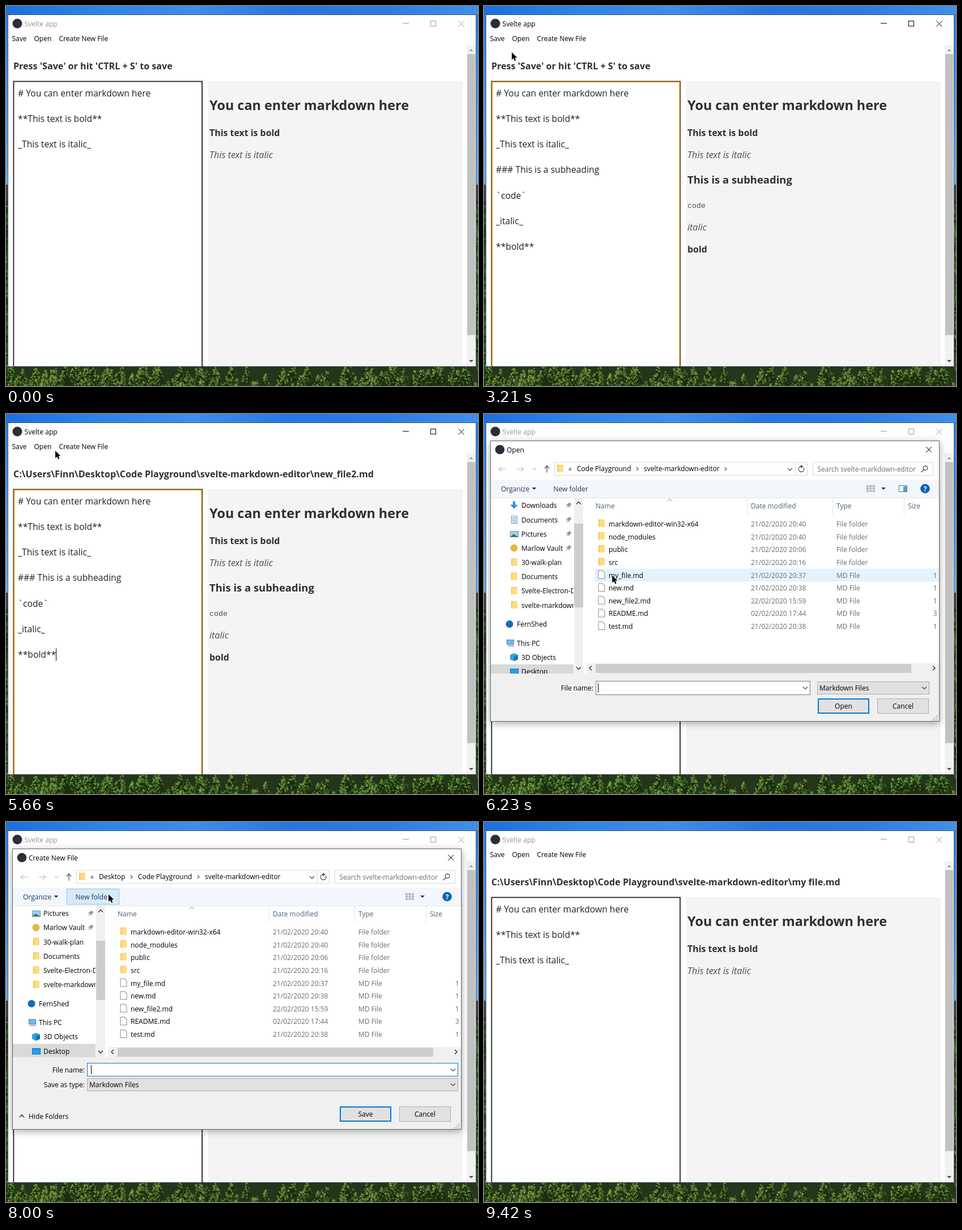
An HTML page with a canvas that plays this animation: 833 by 672 pixels, repeating every 9440 ms.

```html
<!DOCTYPE html>
<html lang="en">
<head>
<meta charset="utf-8">
<title>Markdown editor</title>
<style>
html, body { margin: 0; width: 100%; height: 100%; overflow: hidden; background: #fff; }
canvas { display: block; width: 833px; height: 672px; }
</style>
</head>
<body>
<canvas id="stage" width="833" height="672"></canvas>
<script>
const W = 833, H = 672, LOOP = 9440;
const stage = document.getElementById('stage');
let g = stage.getContext('2d');
const SANS = '"Open Sans", "Noto Sans", sans-serif';
const MONO = '"Liberation Mono", monospace';

// ---------- drawing helpers ----------
function box(x, y, w, h, color) {
  g.fillStyle = color;
  g.fillRect(x, y, w, h);
}
function frame(x, y, w, h, fill, edge, line = 1) {
  box(x, y, w, h, edge);
  box(x + line, y + line, w - 2 * line, h - 2 * line, fill);
}
function text(s, x, y, color = '#000', size = 12, style = '', align = 'left', family = SANS) {
  g.font = `${style} ${size}px ${family}`;
  g.textAlign = align;
  g.fillStyle = color;
  g.fillText(s, x, y);
}
function poly(points, color, fill, line = 1) {
  g.beginPath();
  points.forEach(([x, y], i) => i ? g.lineTo(x, y) : g.moveTo(x, y));
  if (fill) {
    g.closePath();
    g.fillStyle = color;
    g.fill();
  } else {
    g.lineWidth = line;
    g.strokeStyle = color;
    g.stroke();
  }
}
function disc(x, y, r, color) {
  g.beginPath();
  g.arc(x, y, r, 0, 7);
  g.fillStyle = color;
  g.fill();
}
function chevron(x, y, dir, color = '#444', s = 4, line = 1.2) {
  const h = s / 2;
  const shape = {
    down: [[x - s, y - h], [x, y + h], [x + s, y - h]],
    up: [[x - s, y + h], [x, y - h], [x + s, y + h]],
    right: [[x - h, y - s], [x + h, y], [x - h, y + s]],
    left: [[x + h, y - s], [x - h, y], [x + h, y + s]]
  };
  poly(shape[dir], color, false, line);
}
function triangle(x, y, s, color) {
  poly([[x - 4, y - s], [x + 4, y - s], [x, y + s]], color, true);
}
function cross(x, y, r, color) {
  poly([[x - r, y - r], [x + r, y + r]], color);
  poly([[x + r, y - r], [x - r, y + r]], color);
}
function arrow(x, y, dx, dy, color) {
  const tip = [x + dx * 6, y + dy * 6];
  poly([[x - dx * 6, y - dy * 6], tip], color, false, 1.3);
  poly([[tip[0] - dx * 5 - dy * 4, tip[1] - dy * 5 - dx * 4], tip,
    [tip[0] - dx * 5 + dy * 4, tip[1] - dy * 5 + dx * 4]], color, false, 1.3);
}
function clipped(x, y, w, h, draw) {
  g.save();
  g.beginPath();
  g.rect(x, y, w, h);
  g.clip();
  draw();
  g.restore();
}

// ---------- desktop, painted once ----------
function paintDesktop() {
  const c = document.createElement('canvas');
  c.width = W;
  c.height = H;
  const main = g;
  g = c.getContext('2d');
  let seed = 11;
  const rnd = () => (seed = (seed * 16807) % 2147483647) / 2147483647;

  const top = g.createLinearGradient(0, 0, W, 0);
  ['#1d6fdc', '#2f83e6', '#3c8eea', '#2678e0', '#2a7ce2', '#3f90ea'].forEach((k, i) => top.addColorStop(i / 5, k));
  box(0, 0, W, H, top);
  const sky = g.createLinearGradient(0, 15, 0, 325);
  sky.addColorStop(0, '#2a7ee2');
  sky.addColorStop(1, '#6fb2ee');
  box(0, 15, W, 310, sky);
  box(0, 316, W, 46, '#3c4146');
  box(0, 345, W, H, '#24361a');
  const greens = ['#16230d', '#24391a', '#35521f', '#4a6e2a', '#618a36', '#7ba244'];
  for (let i = 0; i < 700; i++) {
    const x = rnd() < .5 ? rnd() * 4 : 829 + rnd() * 4;
    box(x, 350 + rnd() * 290, 2, 2 + rnd() * 5, greens[Math.floor(rnd() * 5)]);
  }
  for (let i = 0; i < 150; i++) {
    const x = rnd() * W, y = 626 + i * .24 + rnd() * 8, wide = 7 + rnd() * 7;
    poly([[x, y], [x + wide, y + 36], [x - wide, y + 36]], '#1b2c10', true);
    for (let k = 0; k < 42; k++) {
      const d = rnd(), side = rnd() * 2 - 1;
      const tone = Math.max(0, Math.min(5, Math.floor(3.6 - side * 1.5 - d * 1.6 + rnd() * 2)));
      box(x + side * wide * (d + .12), y + d * 34, 1 + rnd() * 2.2, 1 + rnd() * 2.4, greens[tone]);
    }
  }
  g = main;
  return c;
}
const desktop = paintDesktop();

// ---------- script of events ----------
const BASE = ['# You can enter markdown here', '**This text is bold**', '_This text is italic_'];
const ADDED = [
  { s: '### This is a subheading', from: 940, to: 1420 },
  { s: '`code`', from: 1490, to: 1620 },
  { s: '_italic_', from: 1700, to: 1920 },
  { s: '**bold**', from: 2040, to: 2560 }
];
const ROOT = 'C:\\Users\\Finn\\Desktop\\Code Playground\\svelte-markdown-editor\\';
const DIALOGS = [
  { kind: 'save', from: 3680, to: 4790, name: 'new_file2', keys: [3980, 4610] },
  { kind: 'open', from: 5900, to: 7060 },
  { kind: 'save', from: 7780, to: 9310, name: 'my file', keys: [8300, 8950], deep: true }
];
// each run: time, x, y
const MOUSE = [
  [[90, 420, 330], [470, 176, 246], [690, 176, 246]],
  [[2900, 150, 214], [3210, 49, 82], [3260, 49, 80], [3520, 138, 60], [3980, 150, 62]],
  [[4890, 634, 514], [5220, 122, 427], [5280, 122, 427], [5660, 87, 65], [5780, 66, 58],
    [5900, 66, 58], [6300, 240, 305], [6420, 240, 305], [6880, 631, 513], [7080, 631, 513],
    [7600, 142, 59], [7780, 142, 59], [7980, 181, 128], [8290, 181, 128]]
];

const inside = (t, a, b) => t >= a && t < b;
function typed(s, t, from, to) {
  return s.slice(0, Math.floor(s.length * Math.max(0, Math.min(1, (t - from) / (to - from))) + 1e-6));
}
function mouseAt(t) {
  for (const run of MOUSE) {
    for (let i = 1; i < run.length; i++) {
      const a = run[i - 1], b = run[i];
      if (!inside(t, a[0], b[0])) continue;
      const p = (t - a[0]) / (b[0] - a[0]), e = p * p * (3 - 2 * p);
      return { x: a[1] + (b[1] - a[1]) * e, y: a[2] + (b[2] - a[2]) * e };
    }
  }
  return null;
}
function linesAt(t) {
  const lines = BASE.slice();
  if (t < 7060) for (const a of ADDED) if (t >= a.from) lines.push(typed(a.s, t, a.from, a.to));
  return lines;
}
function pathAt(t) {
  if (t < 4860) return "Press 'Save' or hit 'CTRL + S' to save";
  return ROOT + (t < 7060 ? 'new_file2.md' : t < 9310 ? 'new.md' : 'my file.md');
}

// ---------- editor window ----------
const PREVIEW_Y = [183.5, 229.5, 269, 313.5, 357, 396.5, 436];
function preview(line, y) {
  const rules = [
    [/^# (.+)$/, '#2f2f2f', 23.4, 'bold'],
    [/^### (.+)$/, '#2f2f2f', 18.45, 'bold'],
    [/^\*\*(.+)\*\*$/, '#2f2f2f', 15.9, 'bold'],
    [/^_(.+)_$/, '#4c4c4c', 16.2, 'italic'],
    [/^`(.+)`$/, '#4c4c4c', 13.33, '', MONO]
  ];
  for (const [re, color, size, style, family] of rules) {
    const m = line.match(re);
    if (m) return text(m[1], 359, y, color, size, style, 'left', family);
  }
  text(line, 359, y, '#333', 15.7);
}
function drawApp(t, active, focus) {
  box(3, 15, 827, 623, '#4a5a68');
  box(4, 16, 825, 621, '#fff');
  disc(20, 31, 8.5, '#2b2e3a');
  text('Svelte app', 32.5, 35.5, active ? '#000' : '#8f9899', 12.1);
  const ink = active ? '#000' : '#999';
  box(700, 30, 11, 1, ink);
  g.lineWidth = 1;
  g.strokeStyle = ink;
  g.strokeRect(749.5, 26.5, 9, 9);
  cross(803.5, 31.5, 5, ink);
  text('Save', 10.5, 62);
  text('Open', 49.5, 62);
  text('Create New File', 93.5, 62);

  box(813, 69, 16, 568, '#f1f1f1');
  box(814, 85, 14, 497, '#c1c1c1');
  poly([[817, 80], [825, 80], [821, 76]], '#a3a3a3', true);
  triangle(821, 628, 2, '#505050');

  text(pathAt(t), 13, 111.5, '#2f2f2f', 16.1, 'bold');
  box(357, 133, 449, 504, '#f4f4f4');
  clipped(12, 132, 336, 505, () => {
    frame(12.5, 132.5, 334.5, 530, '#fff', '#222', 1.8);
    if (focus) frame(13.5, 133.5, 332.5, 530, '#fff', '#e59a10', 1.6);
  });
  const lines = linesAt(t);
  lines.forEach((line, i) => {
    text(line, 21, 159.5 + i * 45.25, '#222', 15.7);
    preview(line, PREVIEW_Y[i]);
  });
  if (focus) {
    let last = t >= 5230 ? 5230 : 500;
    for (const a of ADDED) if (t < 5230 && t >= a.from) last = Math.min(t, a.to);
    if ((t - last) % 1000 < 500) {
      const i = lines.length - 1;
      g.font = `15.7px ${SANS}`;
      box(Math.round(21 + g.measureText(lines[i]).width), 143 + i * 45.25, 1, 22, '#000');
    }
  }
}

// ---------- file dialog ----------
function folder(x, y) {
  box(x, y, 10, 13, '#f3c55a');
  box(x + 2, y + 1, 9, 12, '#ffdc82');
}
function sheet(x, y) {
  poly([[x, y], [x + 8, y], [x + 12, y + 4], [x + 12, y + 15], [x, y + 15]], '#8a8a8a', true);
  poly([[x + 1, y + 1], [x + 7.5, y + 1], [x + 11, y + 4.5], [x + 11, y + 14], [x + 1, y + 14]], '#fff', true);
}
function picture(x, y) {
  frame(x, y + 2, 15, 11, '#9fd2f4', '#6b8ba4');
  poly([[x + 1, y + 12], [x + 6, y + 7], [x + 14, y + 12]], '#3a7a5a', true);
}
const SIDE_ICONS = {
  down: (x, y) => {
    box(x + 5, y, 4, 7, '#2f8fe0');
    poly([[x, y + 6], [x + 14, y + 6], [x + 7, y + 13]], '#2f8fe0', true);
  },
  doc: (x, y) => {
    frame(x + 2, y, 11, 14, '#fff', '#7c8b99');
    for (let i = 0; i < 4; i++) box(x + 4, y + 3 + i * 2.5, 7, 1, '#4b8fd0');
  },
  pic: picture,
  vault: (x, y) => disc(x + 7, y + 7, 6.5, '#e5b93c'),
  folder: (x, y) => folder(x + 2, y),
  cloud: (x, y) => disc(x + 8, y + 7, 6.5, '#0f6cbf'),
  pc: (x, y) => {
    frame(x + 3, y + 1, 13, 9, '#6cbcf2', '#4a7fa8');
    box(x + 5, y + 11, 11, 2, '#9aa7b0');
  },
  cube: (x, y) => {
    poly([[x, y + 3], [x + 7, y], [x + 14, y + 3], [x + 14, y + 11], [x + 7, y + 14], [x, y + 11]], '#35a0dc', true);
    poly([[x + 7, y + 6], [x + 14, y + 3], [x + 14, y + 11], [x + 7, y + 14]], '#1673b8', true);
  },
  desk: (x, y) => frame(x, y + 2, 15, 11, '#1fa0f2', '#0d6fb8')
};
const SIDE = [
  ['down', 'Downloads', 161.5], ['doc', 'Documents', 187], ['pic', 'Pictures', 212],
  ['vault', 'Marlow Vault', 237], ['folder', '30-walk-plan', 262.3], ['folder', 'Documents', 287.5],
  ['folder', 'Svelte-Electron-Demo', 312.6], ['folder', 'svelte-markdown-editor', 338],
  ['cloud', 'FernShed', 371.5], ['pc', 'This PC', 405], ['cube', '3D Objects', 430], ['desk', 'Desktop', 455.3]
];
const DAY = '21/02/2020 ';
const FILES = [
  ['markdown-editor-win32-x64', DAY + '20:40'], ['node_modules', DAY + '20:40'],
  ['public', DAY + '20:06'], ['src', DAY + '20:16'],
  ['my_file.md', DAY + '20:37', 1], ['new.md', DAY + '20:38', 1],
  ['new_file2.md', '22/02/2020 15:59', 1], ['README.md', '02/02/2020 17:44', 3], ['test.md', DAY + '20:38', 1]
];
function pin(x, y) {
  g.save();
  g.translate(x, y);
  g.rotate(.78);
  box(-2.5, -5, 5, 5, '#8d9499');
  box(-4, 0, 8, 1.5, '#8d9499');
  box(-.5, 1, 1, 5, '#8d9499');
  g.restore();
}
function button(label, x, fill, edge, line) {
  frame(x, 503, 91, 27, fill, edge, line);
  text(label, x + 45.5, 521, '#000', 12, '', 'center');
}
function drawNav(d) {
  arrow(32, 97.5, -1, 0, '#c8c8c8');
  arrow(64, 97.5, 1, 0, '#c8c8c8');
  chevron(89, 97.5, 'down', '#c0c0c0', 3);
  arrow(111, 97.5, 0, -1, '#555');
  frame(124, 85, 447, 24, '#fff', '#d9d9d9');
  folder(129, 90);
  text('«', 149, 100.5, '#333');
  const parts = ['Code Playground', 'svelte-markdown-editor'];
  if (d.deep) parts.unshift('Desktop');
  let x = 164;
  parts.forEach((p, i) => {
    text(p, x, 101);
    x += g.measureText(p).width;
    if (!d.deep || i < 2) chevron(x + 11, 97, 'right', '#555', 3.2);
    x += 22.5;
  });
  chevron(540, 98, 'down', '#444', 4);
  box(549, 86, 1, 22, '#d9d9d9');
  g.beginPath();
  g.arc(560, 97.5, 4.8, -.6, 4.6);
  g.strokeStyle = '#555';
  g.lineWidth = 1.4;
  g.stroke();
  poly([[559, 90], [564, 92.5], [559, 96]], '#555', true);
  frame(580, 85, 213, 24, '#fff', '#d9d9d9');
  text('Search svelte-markdown-editor', 588.5, 101.5, '#6d6d6d', 11.95);
  g.beginPath();
  g.arc(779, 95.5, 3.8, 0, 7);
  g.stroke();
  poly([[776, 98.5], [771.5, 103]], '#555', false, 1.6);
}
function drawToolbar(isOpen, hover) {
  box(12, 116, 791, 32, '#f3f6fa');
  box(12, 148, 791, 1, '#e3e8ee');
  if (hover) frame(107, 118, 93, 28, '#d8eaf6', '#8cc6e6');
  text('Organize', 30, 136.5, '#1e395b');
  triangle(88.5, 132, 2, '#1e395b');
  text('New folder', 122.5, 136.5, '#1e395b');
  const vx = isOpen ? 675 : 705;
  for (let i = 0; i < 3; i++) for (let k = 0; k < 3; k++) {
    frame(vx + k * 5.5, 126 + i * 4.3, 4, 3, '#dfe6ec', '#8c949c', .8);
  }
  triangle(vx + 30, 132, 2, '#1e395b');
  if (isOpen) {
    frame(732, 126, 15, 12, '#fff', '#5a6f84');
    box(740, 128, 6, 9, '#4aa0e6');
  }
  disc(778.5, 132, 8.3, '#0a63b5');
  text('?', 778.5, 136.5, '#fff', 12, 'bold', 'center');
}
function drawSide(isOpen, bottom) {
  const shift = isOpen ? 0 : -50.3;
  clipped(12, 149, 146, bottom - 149, () => {
    SIDE.forEach(([icon, label, yy], i) => {
      const y = yy + shift, root = icon === 'cloud' || icon === 'pc';
      if (i === SIDE.length - 1) box(12, y - 12.7, 146, 25, '#d9d9d9');
      SIDE_ICONS[icon](root ? 37 : 46, y - 7);
      text(label, root ? 58 : 66, y + 4.5);
      if (i < 4) pin(149, y);
    });
  });
  box(159, 149, 16, bottom - 149, '#f0f0f0');
  if (isOpen) box(159, 194, 16, 148, '#cdcdcd');
  else box(159, 210, 16, 105, '#cdcdcd');
  chevron(167, 157.5, 'up', '#404040', 4, 1.6);
  chevron(167, bottom - 9.5, 'down', '#404040', 4, 1.6);
}
function drawFiles(t, isOpen, mouse) {
  [['Name', 197], ['Date modified', 471], ['Type', 622], ['Size', 748]].forEach(([s, x]) => text(s, x, 167, '#4c607a'));
  [464, 615, 741].forEach(x => box(x, 149, 1, 29, '#e5e5e5'));
  chevron(327.5, 152, 'up', '#777', 4, 1);
  const rows = FILES.filter(f => f[0] !== 'new_file2.md' || t > 4800);
  rows.forEach(([name, date, size], i) => {
    const y = 194.5 + i * 22.63;
    const over = mouse && mouse.x > 195 && mouse.x < 790 && Math.abs(mouse.y - y) < 11.3;
    if (isOpen && name === 'new.md' && t >= 6360) box(195, y - 11.5, 607, 23, '#d9d9d9');
    else if (over) box(195, y - 11.5, 607, 23, '#e5f3ff');
    if (size) sheet(201.5, y - 8.5); else folder(202, y - 8);
    text(name, 220, y + 4.5);
    text(date, 471, y + 4.5, '#6d6d6d');
    text(size ? 'MD File' : 'File folder', 622, y + 4.5, '#6d6d6d');
    if (size) text(size, 799.5, y + 4.5, '#6d6d6d', 12, '', 'right');
  });
}
function drawSaveFields(t, d) {
  text('File name:', 139, 443, '#000', 12, '', 'right');
  frame(143, 426, 655, 24, '#fff', '#0078d7');
  const name = typed(d.name, t, ...d.keys);
  text(name, 149, 442.5);
  const last = t < d.keys[0] ? d.from : Math.min(t, d.keys[1]);
  if ((t - last) % 1000 < 500) box(Math.round(149.5 + g.measureText(name).width), 430, 1, 16, '#000');
  chevron(789, 438.5, 'down');
  text('Save as type:', 139, 469, '#000', 12, '', 'right');
  frame(143, 453, 655, 23, '#e1e1e1', '#adadad');
  text('Markdown Files', 147, 469);
  chevron(789, 464.5, 'down');
  chevron(28, 520, 'up', '#333', 4, 1.6);
  text('Hide Folders', 40, 524.5);
  button('Save', 589, '#e1e1e1', '#0078d7', 2);
}
function drawOpenFields(t, mouse) {
  text('File name:', 193, 489, '#000', 12, '', 'right');
  frame(197, 472, 379, 25, '#fff', '#7a7a7a');
  if (t >= 6360) {
    g.font = `12px ${SANS}`;
    box(200, 475, g.measureText('new.md').width + 1, 19, '#0078d7');
    text('new.md', 200.5, 489, '#fff');
  } else if ((t - 5900) % 1000 < 500) {
    box(201, 476, 1, 16, '#000');
  }
  chevron(567, 484.5, 'down');
  frame(588, 473, 198, 23, '#e1e1e1', '#adadad');
  text('Markdown Files', 592, 489);
  chevron(777, 484.5, 'down');
  const over = mouse && mouse.x > 589 && mouse.y > 503;
  if (t >= 6980) button('Open', 589, '#cce4f7', '#1a68a8', 1);
  else if (over) button('Open', 589, '#e5f1fb', '#0078d7', 1);
  else button('Open', 589, '#e1e1e1', '#0078d7', 2);
}
function drawDialog(t, d, mouse) {
  const isOpen = d.kind === 'open', bottom = isOpen ? 459 : 416;
  g.save();
  g.shadowColor = 'rgba(0,0,0,.35)';
  g.shadowBlur = 12;
  g.shadowOffsetY = 3;
  box(11, 47, 793, 497, '#666');
  g.restore();
  box(12, 48, 791, 495, '#fff');
  disc(28, 63, 8.3, '#2b2e3a');
  text(isOpen ? 'Open' : 'Create New File', 40, 67.5);
  cross(785, 63, 5, '#000');
  drawNav(d);
  drawToolbar(isOpen, d.deep && mouse && mouse.y > 118 && mouse.y < 146);
  drawSide(isOpen, bottom);
  drawFiles(t, isOpen, mouse);

  const sy = bottom - 18;
  box(180, sy, 623, 18, '#f0f0f0');
  box(197, sy + 1, 557, 16, '#cdcdcd');
  chevron(188, sy + 8.5, 'left', '#404040', 4, 1.6);
  chevron(794, sy + 8.5, 'right', '#404040', 4, 1.6);
  box(12, bottom, 791, 543 - bottom, '#f0f0f0');
  if (isOpen) drawOpenFields(t, mouse); else drawSaveFields(t, d);
  button('Cancel', 694, '#e1e1e1', '#adadad', 1);
  for (let i = 0; i < 3; i++) for (let k = 0; k <= i; k++) box(798 - k * 3.5, 533 + i * 3.5, 2, 2, '#b0b0b0');
}

// ---------- pointer ----------
const POINTER = [[0, 0], [0, 13], [3, 10.3], [5.2, 15], [7.4, 14], [5.3, 9.4], [9.3, 9.2]];
function drawMouse(m, overText) {
  if (overText) {
    box(m.x - .5, m.y - 8, 1, 16, '#000');
    box(m.x - 3, m.y - 8.5, 6, 1, '#000');
    box(m.x - 3, m.y + 7.5, 6, 1, '#000');
    return;
  }
  const shape = POINTER.map(([x, y]) => [m.x + x, m.y + y]);
  poly(shape.concat([shape[0]]), '#fff', false, 1.6);
  poly(shape, '#000', true);
}

function draw(t) {
  const dialog = DIALOGS.find(d => inside(t, d.from, d.to));
  const mouse = mouseAt(t);
  const active = dialog ? dialog.kind === 'open' && t >= 7000 : t >= 500 && t < 9310;
  const focus = inside(t, 500, 3600) || inside(t, 5230, 5860);
  g.drawImage(desktop, 0, 0);
  drawApp(t, active, focus);
  if (dialog) drawDialog(t, dialog, mouse);
  if (mouse) drawMouse(mouse, !dialog && mouse.x > 14 && mouse.x < 345 && mouse.y > 134);
}

const start = performance.now();
function tick() {
  draw((performance.now() - start) % LOOP);
  requestAnimationFrame(tick);
}
tick();
</script>
</body>
</html>
```
